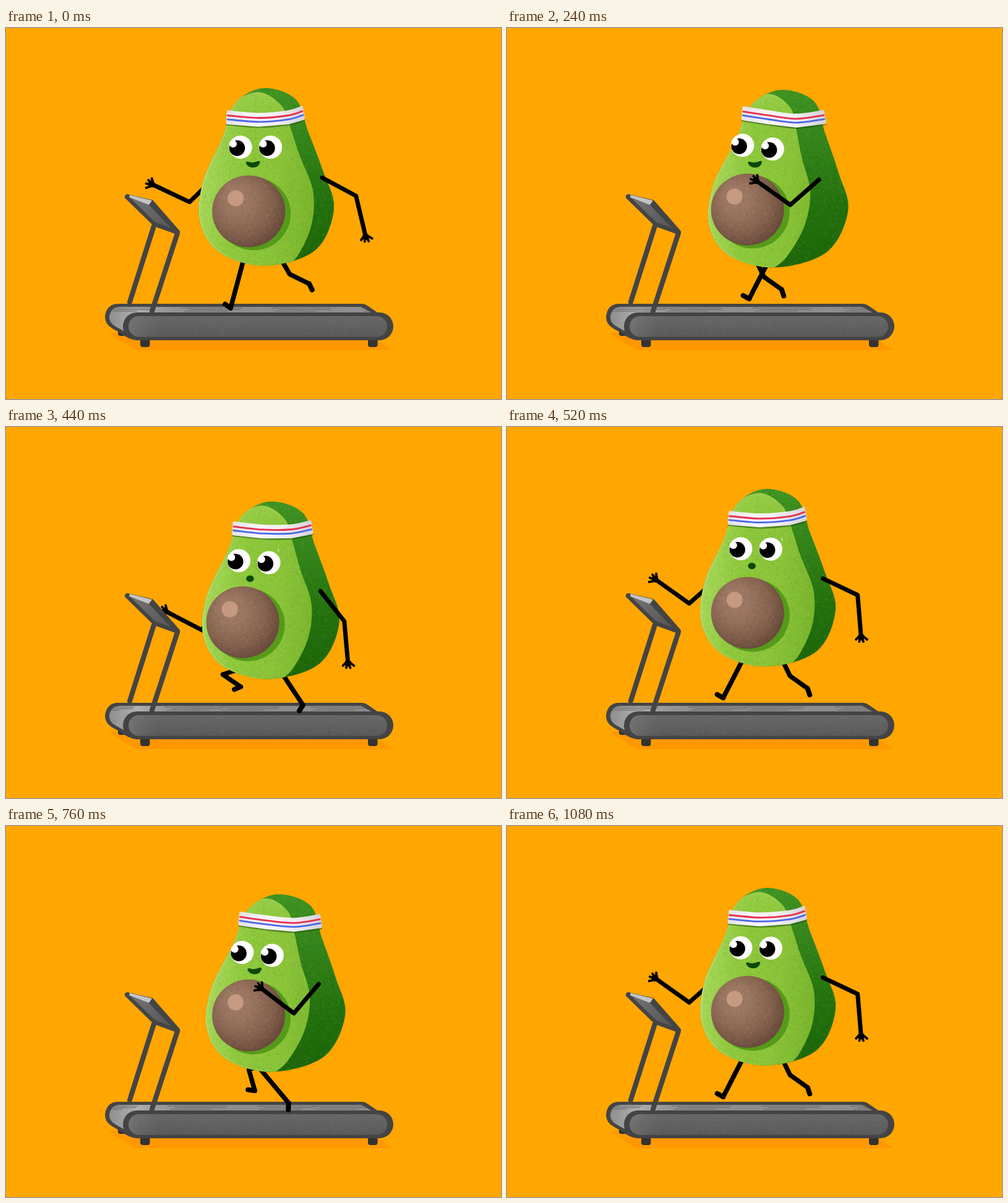
Recreate the animation shown at these times as an HTML page with a canvas. Size 800 by 600 pixels, loop 1120 ms.

```html
<!DOCTYPE html>
<html lang="en">
<head>
<meta charset="utf-8">
<title>Treadmill avocado</title>
<style>
html, body { margin: 0; width: 100%; height: 100%; overflow: hidden; background: #ffa600; }
canvas { display: block; }
</style>
</head>
<body>
<canvas id="stage" width="800" height="600"></canvas>
<script>
const ctx = document.getElementById('stage').getContext('2d');
const LOOP = 1120, STRIDE = 560, STEP = 40, TAU = Math.PI * 2, DEG = Math.PI / 180;
const BELT_TRAVEL = 525, BELT_SPEED = BELT_TRAVEL / LOOP;
const BODY_HEIGHT = 286, FAR_LEG_LEAD = STRIDE / 2;

// One cosine per stride, peaking at the given time; bounce runs twice as fast
const swing = (t, peak = 0) => Math.cos(TAU * (t - peak) / STRIDE);
const bounce = (t, peak = 0) => Math.cos(2 * TAU * (t - peak) / STRIDE);
const lerp = (a, b, k) => a + (b - a) * k;
const bodyTop = t => 110 - 13 * bounce(t, -8);

// ---- drawing helpers ----

function curve(pts, closed) {
  const n = pts.length;
  const at = k => closed ? pts[(k + n) % n] : pts[Math.max(0, Math.min(n - 1, k))];
  const path = new Path2D();
  path.moveTo(...pts[0]);
  for (let i = 0; i < (closed ? n : n - 1); i++) {
    const [a, b, c, d] = [at(i - 1), at(i), at(i + 1), at(i + 2)];
    path.bezierCurveTo(b[0] + (c[0] - a[0]) / 6, b[1] + (c[1] - a[1]) / 6,
      c[0] - (d[0] - b[0]) / 6, c[1] - (d[1] - b[1]) / 6, c[0], c[1]);
  }
  return path;
}

function trace(pts) {
  const path = new Path2D();
  pts.forEach(p => path.lineTo(...p));
  return path;
}

function fill(path, color) {
  ctx.fillStyle = color;
  ctx.fill(path);
}

function stroke(path, width, color = '#000') {
  ctx.lineWidth = width;
  ctx.strokeStyle = color;
  ctx.stroke(path);
}

const line = (pts, width, color) => stroke(trace(pts), width, color);

function oval(x, y, rx, ry, color) {
  const path = new Path2D();
  path.ellipse(x, y, rx, ry, 0, 0, TAU);
  fill(path, color);
  return path;
}

function box(x, y, w, h, r, color) {
  const path = new Path2D();
  path.roundRect(x, y, w, h, r);
  fill(path, color);
  return path;
}

function blend(grad, ...colors) {
  colors.forEach((c, i) => grad.addColorStop(i / (colors.length - 1), c));
  return grad;
}
const ramp = (x0, y0, x1, y1, ...colors) => blend(ctx.createLinearGradient(x0, y0, x1, y1), ...colors);

function inside(path, paint) {
  ctx.save();
  ctx.clip(path);
  paint();
  ctx.restore();
}

// Airbrush speckle
const grain = (() => {
  const tile = document.createElement('canvas');
  tile.width = tile.height = 200;
  const g = tile.getContext('2d');
  let seed = 7;
  const rnd = () => (seed = seed * 16807 % 2147483647) / 2147483647;
  for (let i = 0; i < 9000; i++) {
    g.fillStyle = rnd() < 0.5 ? 'rgba(0,30,0,.1)' : 'rgba(255,255,220,.1)';
    g.fillRect(rnd() * 200, rnd() * 200, 1.1, 1.1);
  }
  return ctx.createPattern(tile, 'repeat');
})();

function speckle(x, y, w, h, alpha = 1) {
  ctx.save();
  ctx.translate(x, y);
  ctx.globalAlpha = alpha;
  ctx.fillStyle = grain;
  ctx.fillRect(0, 0, w, h);
  ctx.restore();
}

// ---- treadmill ----

function treadmill(t) {
  fill(trace([[166, 494], [210, 521], [624, 521], [598, 503], [200, 490]]), '#ff9800');
  box(181, 486, 12, 12, 4, '#333');
  for (const x of [217, 585]) box(x, 502, 15.5, 14, 4, '#333');

  fill(new Path2D('M182 446H575Q580 446 584 449L606 464L211 504Q198 504 188 495L172 486Q160 479 160 467Q162 446 182 446Z'), '#444');
  const belt = new Path2D('M184 451H574L592 461H212Q192 463 190 483V490L176 482Q166 476 167 466Q170 451 184 451Z');
  inside(belt, () => {
    ctx.fillStyle = ramp(167, 0, 300, 0, '#8f8f8f', '#b0b0b0', '#989898', '#8d8d8d');
    ctx.fillRect(160, 446, 450, 50);
    for (let i = 0; i < 4; i++) {
      const x = 75 + (65 + i * 145 + t * BELT_SPEED) % BELT_TRAVEL;
      for (let row = 0; row < 3; row++) {
        const dx = x + row * 11 % 18;
        line([[dx, 453 + row * 2.5], [dx + 96 - row * 14, 453 + row * 2.5]], 1.1, '#696969');
      }
    }
    speckle(160, 446, 450, 50, 0.6);
  });

  box(189, 460, 437, 45, 22.5, '#444');
  const panel = box(198, 466, 418, 33.5, 17, ramp(0, 466, 0, 500, '#686868', '#595959'));
  inside(panel, () => {
    ctx.fillStyle = ramp(198, 0, 250, 0, 'rgba(130,130,130,.5)', 'rgba(110,110,110,0)');
    ctx.fillRect(198, 466, 60, 34);
    speckle(198, 466, 420, 36, 0.5);
  });
}

function consolePanel() {
  line([[239, 320], [200, 443]], 8, '#444');
  line([[277, 332], [236, 458]], 8, '#444');
  const slab = trace([[196, 273], [235, 282], [277, 330], [241, 317], [196, 273]]);
  fill(slab, '#444');
  stroke(slab, 8, '#444');
  fill(trace([[202, 276], [230, 285], [267, 324], [241, 314]]), ramp(205, 275, 262, 325, '#737373', '#565656'));
  fill(trace([[200, 270], [236, 279], [231, 286], [199, 274]]), '#c4c4c4');
}

// ---- limbs ----

// Rides the belt while planted, then kicks up and swings forward
function ankleAt(p) {
  if (p <= 200) return [363 + p * BELT_SPEED, 453 - 5 * (p / 200) ** 2];
  const lift = Math.sin(Math.PI * ((p - 200) / 360) ** 0.7) ** 0.75;
  return [398 + 50 * Math.cos(Math.PI * (p - 275) / 265), 453 - 43 * lift];
}

// Knee of a two-bone limb that bends towards the left
function kneeAt(hip, ankle, thigh, shin) {
  const dx = ankle[0] - hip[0], dy = ankle[1] - hip[1], d = Math.hypot(dx, dy);
  const along = Math.min(d / 2, thigh) + (thigh ** 2 - shin ** 2) / (2 * d);
  const out = Math.sqrt(Math.max(0, thigh ** 2 - along ** 2));
  const bend = d < thigh + shin ? out : 0;
  return [hip[0] + (dx * along - dy * bend) / d, hip[1] + (dy * along + dx * bend) / d];
}

function leg(t, dx) {
  const p = t % STRIDE;
  const hip = [392 + 7 * swing(p, 220), bodyTop(p) + 268];
  const ankle = ankleAt(p);
  const knee = kneeAt(hip, ankle, 38, 35);
  const tilt = (40 - 76 * swing(p)) * DEG;
  const toe = [ankle[0] - 11 * Math.cos(tilt), ankle[1] + 11 * Math.sin(tilt)];
  ctx.save();
  ctx.translate(dx, 0);
  line([hip, knee, ankle], 7.5);
  line([ankle, toe], 8);
  ctx.restore();
}

// Angles are measured from straight down, positive towards the back
const reach = ([x, y], angle, len) => [x + len * Math.sin(angle), y + len * Math.cos(angle)];

function arm(shoulder, t) {
  const upper = (8 + 57 * swing(t, -30)) * DEG;
  const whip = 12 * bounce(t, STRIDE / 8);
  const fore = (-51 + 66 * Math.tanh(2.5 * swing(t, -44)) + whip) * DEG;
  const elbow = reach(shoulder, upper, 62), wrist = reach(elbow, fore, 64);
  line([shoulder, elbow, wrist], 7);
  for (let i = 0; i < 4; i++) line([wrist, reach(wrist, fore + 0.8 - i * 0.55, 13 - i * 0.6)], 3.8);
  const palm = reach(wrist, fore, 4);
  oval(...palm, 5.5, 5.5, '#000');
}

const nearArm = t => arm([507.5 + 3.5 * swing(t), bodyTop(t) + 145], t);
const farArm = t => arm([341, bodyTop(t) + 146 - 8 * swing(t, 80)], t + STRIDE / 2);

// ---- body ----

// Key points seen from the front; x in stage pixels, y below the crown
const OUTLINE = [
  [415, 0], [370, 25], [350, 80], [318, 153], [314, 218], [347, 267],
  [420, 287], [500, 262], [530, 195], [512, 133], [489, 72], [468, 18]
];
const FRONT_EDGE = [
  [364, 30], [378, 16], [412, 7], [445, 28], [459, 62], [475, 110], [496, 165], [494, 220], [472, 270], [448, 292]
];

function headband(u, top) {
  const mix = (x0, y0, x1, y1) => [lerp(x0, x1, u), top + lerp(y0, y1, u)];
  const upper = [mix(359, 38, 379, 30), mix(408, 42, 421, 36), mix(455, 38, 465, 40), mix(478, 31, 506, 34)];
  const at = f => upper.map(([x, y], i) => [x + (i - 1) * 1.5 * f, y + 18.5 * f]);
  stroke(curve(at(1.1)), 4, 'rgba(20,70,5,.5)');
  const shape = curve(upper);
  at(1).reverse().forEach(p => shape.lineTo(...p));
  shape.closePath();
  const white = ramp(upper[0][0], 0, upper[3][0], 0, '#e6e3e6', '#f8f6f8', '#f0eef0', '#d8d4d8');
  fill(shape, white);
  stroke(shape, 4, white);
  stroke(curve(at(0.34)), 2.8, '#e72f50');
  stroke(curve(at(0.68)), 2.8, '#4a67ea');
}

function pit(x, y) {
  oval(x + 8, y + 4, 60, 59, '#559a19');
  const skin = blend(ctx.createRadialGradient(x - 22, y - 24, 5, x - 8, y - 8, 70),
    '#a17c67', '#98735e', '#86624e', '#68483a');
  inside(oval(x, y, 59, 58, skin), () => speckle(x - 60, y - 60, 120, 120));
  oval(x - 21, y - 21, 13, 13, '#c69a80');
}

function eye(x, y) {
  oval(x, y, 18.7, 18.7, '#fff');
  oval(x - 5.5, y + 1.5, 12.7, 12.7, '#000');
  oval(x - 12, y - 5.5, 6, 6, '#fff');
}

function mouth(x, y, puffing) {
  if (puffing) oval(x - 1.5, y + 0.5, 6.3, 5.2, '#0d4a08');
  else fill(new Path2D(`M${x - 11} ${y - 2}q1 -3 5 -1q6 2 13 -1q5 -2 5 1q-2 9 -12 9q-9 -1 -11 -8z`), '#0d4a08');
}

function face(t, center, top) {
  const pitX = center - 41 + 14.5 * swing(t, 45);
  const pitY = top + 194.5 + 5 * swing(t, 30) - 3 * bounce(t, STRIDE / 8);
  const x = pitX - 9.5 - 5.5 * swing(t, 75);
  const y = pitY - 101.3 - 2.7 * bounce(t, -20);
  const tilt = 3.3 - 3.3 * swing(t, 20);
  pit(pitX, pitY);
  eye(x, y);
  eye(x + 48.5, y + tilt);
  mouth(x + 19.5, y + 27 + tilt / 2, t >= 280 && t < 760);

  // Sweat drop sliding down the temple
  if (t >= 320 && t <= 680) {
    const k = (t - 360) / 280, dx = x + 61 + 9 * k, dy = y + tilt - 24 + 14 * k;
    line([[dx, dy - 2], [dx + 0.8, dy + 2]], 1.6, '#b9e6b4');
  }
}

function body(t) {
  const turn = (1 - swing(t)) / 2, u = turn / 0.81, top = bodyTop(t);
  const shape = curve(OUTLINE.map(([x, y]) =>
    [x + u * (23 - 12 * y / BODY_HEIGHT + 0.03 * (x - 420)), y + top]), true);
  const front = curve(FRONT_EDGE.map(([x, y]) => [x + u * (14 - 33 * y / BODY_HEIGHT), y + top]));
  front.lineTo(270, top + 300);
  front.lineTo(270, top + 30);
  front.closePath();

  const left = 311 + 15 * turn, right = 530 + 22 * turn;
  const paint = color => {
    ctx.fillStyle = color;
    ctx.fillRect(260, top - 5, 320, 300);
  };
  inside(shape, () => {
    paint(ramp(right - 60, top, right - 30, top + BODY_HEIGHT, '#3d9220', '#318217', '#21700b', '#1b6507'));
    inside(front, () => {
      paint(ramp(left, top + 150, left + 190, top + 170, '#a9d95c', '#8dc93a', '#8ac437', '#79b52b'));
      paint(ramp(0, top, 0, top + 50, 'rgba(165,214,85,.7)', 'rgba(150,205,70,0)'));
    });
    speckle(280 + 15 * turn, top - 5, 300, 300);
    stroke(shape, 4, ramp(left, 0, left + 110, 0, 'rgba(195,228,135,.55)', 'rgba(195,228,135,0)'));
  });

  headband(u, top);
  face(t, 420.5 + 18.5 * turn, top);
}

function draw(t) {
  ctx.lineCap = ctx.lineJoin = 'round';
  ctx.fillStyle = '#ffa600';
  ctx.fillRect(0, 0, 800, 600);
  treadmill(t);
  leg(t, 0);
  leg(t + FAR_LEG_LEAD, 42);
  farArm(t);
  body(t);
  consolePanel();
  nearArm(t);
}

const start = performance.now();
function tick() {
  const t = (performance.now() - start) % LOOP;
  draw(Math.floor(t / STEP) * STEP);
  requestAnimationFrame(tick);
}
tick();
</script>
</body>
</html>
```
